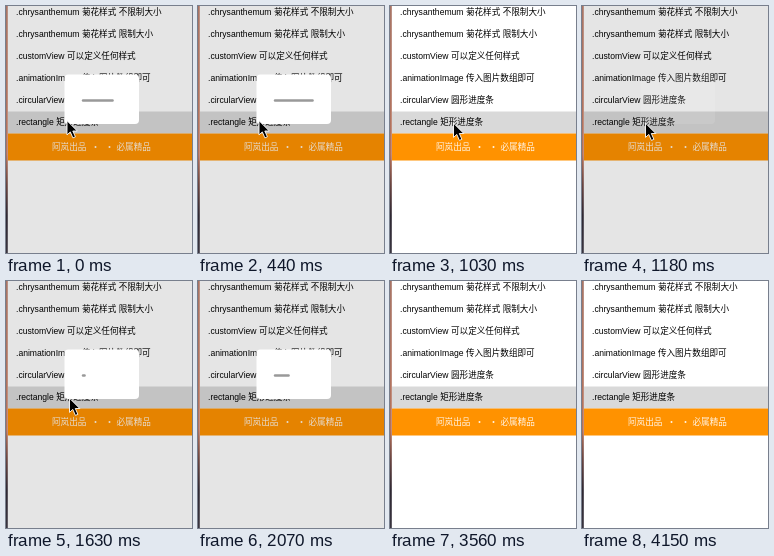
An HTML page that plays this animation: 186 px wide and 247 px high, repeating every 4250 ms.

```html
<!DOCTYPE html>
<html lang="zh">
<head>
<meta charset="utf-8">
<title>Progress popup</title>
<style>
  html, body { margin: 0; width: 100%; height: 100%; overflow: hidden; background: #fff; }
  svg { display: block; width: 100%; height: 100%; }
  text { font-family: "Liberation Sans", "Noto Sans CJK SC", "Noto Sans CJK", sans-serif; font-size: 8.6px; }
</style>
</head>
<body>
<svg viewBox="0 0 186 247">
  <defs>
    <linearGradient id="edge" x1="0" y1="0" x2="0" y2="1">
      <stop offset="0" stop-color="#a87566"/>
      <stop offset=".6" stop-color="#b5725c"/>
      <stop offset=".72" stop-color="#6b4541"/>
      <stop offset=".85" stop-color="#2e2833"/>
      <stop offset="1" stop-color="#3a3540"/>
    </linearGradient>
  </defs>
  <rect width="186" height="247" fill="#fff"/>
  <rect x="2" y="105.5" width="184" height="22" fill="#d9d9d9"/>
  <rect x="2" y="127.5" width="184" height="27" fill="#ff9200"/>
  <g id="rows"></g>
  <g fill="#fff" fill-opacity=".9">
    <text x="46" y="144.3">阿岚出品</text>
    <text x="110.5" y="144.3">必属精品</text>
    <circle cx="89.5" cy="141" r="1"/>
    <circle cx="103.5" cy="141" r="1"/>
  </g>
  <rect id="dim" x="2" width="184" height="247" fill-opacity=".1"/>
  <g id="popup">
    <rect x="58.5" y="68.5" width="74.5" height="49.5" rx="4" fill="#fff"/>
    <rect id="bar" x="75.8" y="93.3" height="2.4" rx="1.2" fill="#999"/>
  </g>
  <rect width="1.8" height="247" fill="url(#edge)"/>
  <path id="cursor" d="M0 0V14.2L3.3 11.2L5.9 17.2L8.4 16.1L5.8 10.3H10.3Z"
        fill="#000" stroke="#fff" stroke-width=".9" stroke-linejoin="round"/>
</svg>
<script>
const LOOP = 4250;
const TICK = 148.3;      // the picture only changes on ticks
const CLOSE = 4;         // tick at which the first popup closes
const OPEN = 8;          // tick at which the second popup opens
const LIFE = 16;         // ticks a popup stays open
const START_AGE = 11.25; // age of the first popup when the loop starts

const $ = id => document.getElementById(id);
const clamp = (v, lo, hi) => Math.min(hi, Math.max(lo, v));
const show = (el, on) => el.setAttribute('visibility', on ? 'visible' : 'hidden');

const labels = [
  '.chrysanthemum 菊花样式 不限制大小',
  '.chrysanthemum 菊花样式 限制大小',
  '.customView 可以定义任何样式',
  '.animationImage 传入图片数组即可',
  '.circularView 圆形进度条',
  '.rectangle 矩形进度条'
];
labels.forEach((label, i) => {
  const row = document.createElementNS('http://www.w3.org/2000/svg', 'text');
  row.setAttribute('x', 10);
  row.setAttribute('y', 9.2 + 22 * i);
  row.textContent = label;
  $('rows').append(row);
});

function drawPopup(tick) {
  const age = tick < CLOSE ? tick + START_AGE : tick - OPEN;
  const open = age >= 0 && age < LIFE;
  const progress = clamp(Math.floor(0.78 * age - 0.6), 0, 10);
  show($('dim'), open);
  $('popup').setAttribute('opacity', open ? Math.min(1, 0.1 + 0.3 * age) : 0);
  $('bar').setAttribute('width', 4 * progress);
}

// The pointer nudges to click, then sweeps out to the lower right.
function drawCursor(tick) {
  const nudge = tick < OPEN - 1 ? 0 : 2.5;
  const u = Math.max(0, (tick - OPEN - 3) / 2);
  const x = 61 + nudge + 118 * u * (2 - u);
  const y = 114.7 + nudge + 73 * u;
  show($('cursor'), u <= 1);
  $('cursor').setAttribute('transform', `translate(${x} ${y})`);
}

function draw(t) {
  const tick = Math.floor((t + 14) / TICK);
  drawPopup(tick);
  drawCursor(tick);
}

const start = performance.now();
function loop() {
  draw((performance.now() - start) % LOOP);
  requestAnimationFrame(loop);
}
loop();
</script>
</body>
</html>
```
